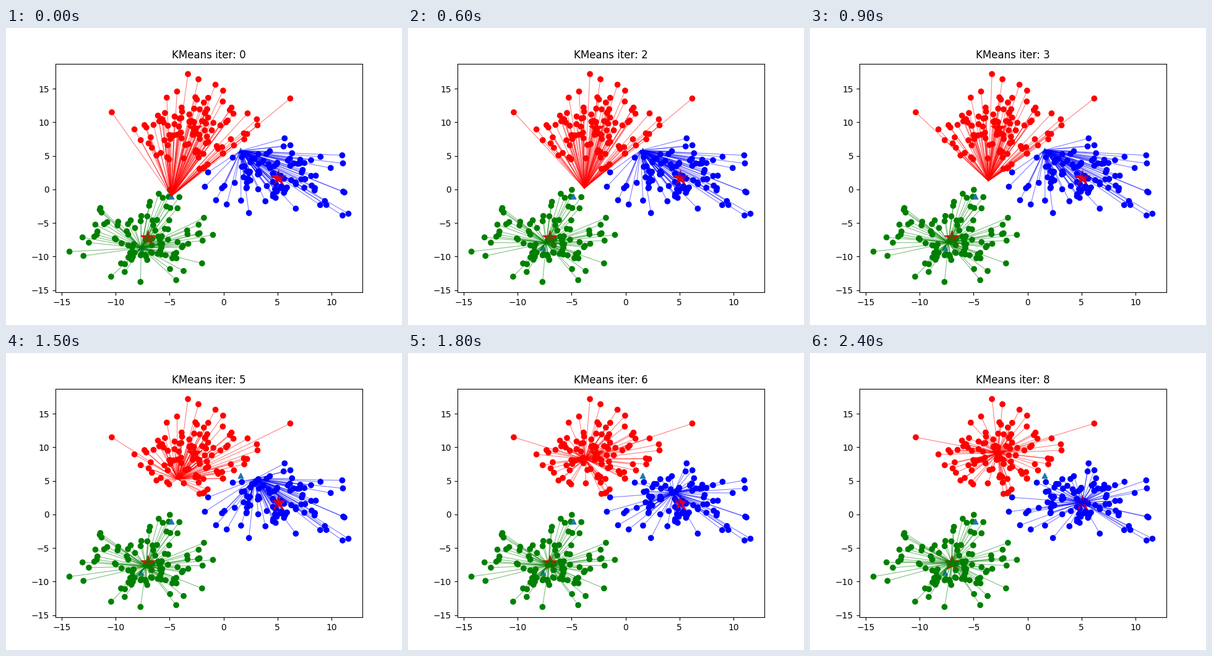
A matplotlib script for the animation above (2700 ms loop, 640 by 480 pixels).

```python
import numpy as np
import matplotlib.pyplot as plt
from matplotlib.animation import FuncAnimation
from matplotlib.collections import LineCollection

STEPS = 9
COLORS = np.array(["red", "blue", "green"])
START = np.array([[-4.86, -1.02], [1.57, 5.75], [-7.64, -8.72]])


def make_blobs(per_blob=100, spread=3.0, seed=42):
    rng = np.random.RandomState(seed)
    middles = rng.uniform(-10, 10, (3, 2))
    return np.vstack([rng.normal(m, spread, (per_blob, 2)) for m in middles])


def nearest(points, centers):
    gaps = points[:, None] - centers[None]
    return (gaps ** 2).sum(axis=2).argmin(axis=1)


def lloyd(points, centers, rounds):
    """Return the centers before and after every round of k-means."""
    history = [centers]
    for _ in range(rounds):
        labels = nearest(points, history[-1])
        history.append(np.array([points[labels == k].mean(axis=0)
                                 for k in range(len(centers))]))
    return history


points = make_blobs()
history = lloyd(points, START, 40)
final = history[-1]
labels = nearest(points, final)

fig, ax = plt.subplots(figsize=(6.4, 4.8), dpi=100)
ax.scatter(*points.T, c=COLORS[labels])
ax.scatter(*START.T, marker="^", c="tab:blue")
ax.scatter(*final.T, marker="*", s=300, c="red")
ax.set_xlim(ax.get_xlim())
ax.set_ylim(ax.get_ylim())

# Spokes lie above the markers.
spokes = LineCollection([], colors=COLORS[labels], linewidths=0.8,
                        alpha=0.5, zorder=2)
ax.add_collection(spokes, autolim=False)
title = ax.set_title("KMeans iter: 0")


def update(step):
    spokes.set_segments(np.stack([points, history[step][labels]], axis=1))
    title.set_text(f"KMeans iter: {step}")
    return spokes, title


anim = FuncAnimation(fig, update, frames=STEPS, interval=300, repeat=True)
plt.show()
```
